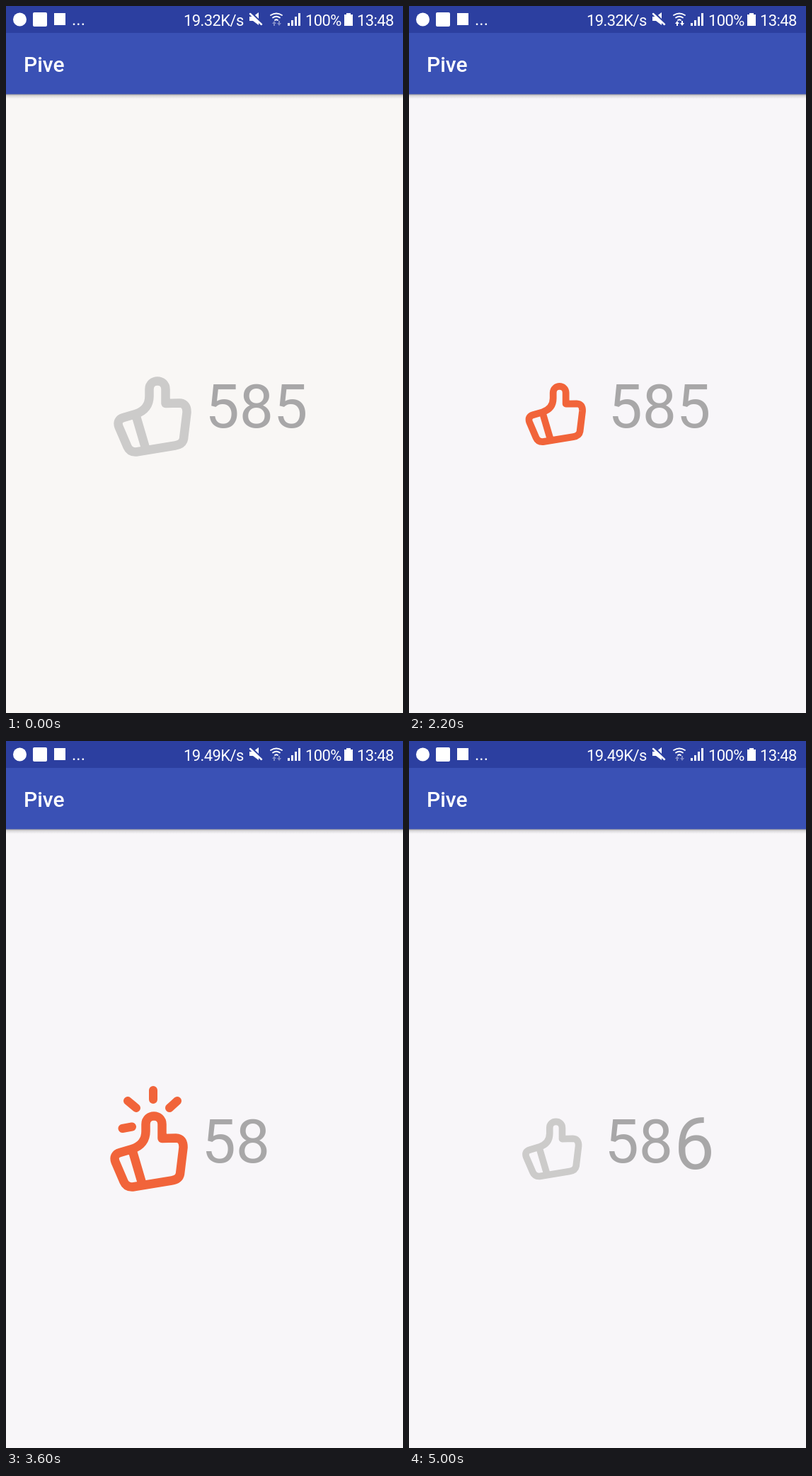
An HTML page for the animation above (5100 ms loop, 561x998 px).

```html
<!DOCTYPE html>
<html lang="en">
<head>
<meta charset="utf-8">
<title>Like button</title>
<style>
  html, body { margin: 0; width: 100%; height: 100%; overflow: hidden; background: #f8f6f9; }
  svg { display: block; width: 100%; height: 100%; font-family: Roboto, sans-serif; }
  .status { fill: #fff; font-size: 22px; letter-spacing: -.6px; }
  .title { fill: #fff; font-size: 30px; font-weight: 500; }
  .count { fill: #a8a7a8; font-size: 86px; }
  .line { fill: none; stroke-linecap: round; stroke-linejoin: round; }
</style>
</head>
<body>
<svg viewBox="0 0 561 998">
  <defs>
    <linearGradient id="shade" x2="0" y2="1">
      <stop offset="0" stop-color="#000" stop-opacity=".4"/>
      <stop offset=".4" stop-color="#000" stop-opacity=".12"/>
      <stop offset="1" stop-color="#000" stop-opacity="0"/>
    </linearGradient>
  </defs>
  <rect id="page" width="561" height="998"/>
  <rect y="124" width="561" height="7" fill="url(#shade)"/>
  <rect width="561" height="124.500" fill="#3a51b5"/>
  <rect width="561" height="38" fill="#2c3fa0"/>
  <text class="title" x="25" y="93">Pive</text>

  <g class="status">
    <circle cx="19.5" cy="19" r="9.5"/>
    <rect x="38" y="9" width="20" height="20" rx="2"/>
    <rect x="68" y="10" width="16" height="17"/>
    <text x="93" y="27" font-size="24" letter-spacing="0">...</text>
    <text id="speed" x="251" y="27.500"></text>
    <text x="423" y="27.500">100%</text>
    <text x="496" y="27.500">13:48</text>
    <path d="M344 15h5l8-6v18l-8-6h-5z"/>
    <path class="line" d="M346 9l16 16" stroke="#2c3fa0" stroke-width="3"/>
    <path class="line" d="M345 11l16 15" stroke="#fff" stroke-width="2.500"/>
    <path class="line" stroke="#fff" stroke-width="1.800" d="M374 13q8-5 16 0M377 16.500q5-3.500 10 0M380 20q2-1.500 4 0"/>
    <path id="arrows" d="M376 25l3-4 3 4h-2v3h-2v-3zM383 24h2v-3h2v3h2l-3 4z"/>
    <path d="M398 24h3v4h-3zM403 20h3v8h-3zM408 15h3v13h-3zM413 10h3v18h-3z"/>
    <path d="M481 10h6v2h3v16h-12v-16h3z"/>
  </g>

  <g id="widget">
    <g id="hand" class="line">
      <path id="thumb" d="M183 576C196 572 202.500 563 202.500 551V541C202.500 525.500 225.500 525.500 225.500 541V561L245 560.500Q256 561 255.500 574L251 611Q249.500 619 239 620.500L184 629.500Q175 630 171.500 622L159.500 594Q156 584 166 581ZL198 627"/>
      <path id="rays" stroke-width="12" d="M169.500 547L183 544.500M177 508L189 518M213 493V506M247 508L236 518"/>
    </g>
    <circle id="ring" cx="208.500" cy="576" fill="none" stroke="#ee4a1e" stroke-width="4"/>
    <text class="count" x="281.500" y="595">58</text>
    <text id="digit" class="count" y="595"></text>
  </g>
</svg>
<script>
const LOOP = 5100, STEP = 100;
const PRESS = 2000, LIKE = 2700, LIKED = 3800, UNLIKE = 4900;
const GREY = '#cccbca', ORANGE = '#f1643a';

const el = {};
document.querySelectorAll('svg [id]').forEach(node => el[node.id] = node);

const set = (node, attrs) => {
  for (const name in attrs) node.setAttribute(name, attrs[name]);
};

// Linear interpolation through [time, value] pairs.
const track = (...keys) => t => {
  const i = keys.findIndex(([time]) => time > t);
  if (i < 0) return keys[keys.length - 1][1];
  if (i === 0) return keys[0][1];
  const [t0, a] = keys[i - 1], [t1, b] = keys[i];
  return a + (b - a) * (t - t0) / (t1 - t0);
};

const handScale = track([1900, 1], [2200, .78], [2400, .75], [2600, .75], [LIKE, .745],
  [2800, .82], [3200, 1], [LIKED, 1], [4100, .753], [4800, .753], [5000, .77]);
const strokeWidth = track([2600, 12.5], [LIKE, 16], [2900, 12.5]);
const rayScale = track([LIKE, .13], [3200, 1]);
const ringRadius = track([LIKE, 32.5], [3200, 57]);
const ringAlpha = track([LIKE, .85], [3200, 0]);
const digitLift = track([LIKE, 3], [3500, -40], [3600, 30], [LIKED, 0],
  [4800, 3], [5000, 9]);
const digitAlpha = track([LIKE, 1], [3500, 0], [3600, 0], [LIKED, 1]);

const scaleAbout = (x, y, s) => `translate(${x} ${y}) scale(${s}) translate(${-x} ${-y})`;

function draw(t) {
  const liking = t >= LIKE && t < LIKED;
  const counting = liking || t >= UNLIKE;
  const orange = t > PRESS && t < UNLIKE;

  set(el.page, { fill: t < PRESS ? '#f9f7f5' : '#f8f6f9' });
  el.speed.textContent = t < 3000 ? '19.32K/s' : '19.49K/s';
  set(el.arrows, { opacity: t >= 1400 && t < LIKE ? 1 : .4 });

  set(el.widget, { transform: `translate(${counting ? -5 : 0} 0)` });
  set(el.hand, { transform: scaleAbout(208, 564, handScale(t)), stroke: orange ? ORANGE : GREY });
  set(el.thumb, { 'stroke-width': strokeWidth(t) });
  set(el.rays, {
    transform: scaleAbout(208.5, 518, rayScale(t)),
    opacity: t >= LIKE && t < UNLIKE ? 1 : 0
  });
  set(el.ring, { r: ringRadius(t), opacity: t >= LIKE ? ringAlpha(t) : 0 });

  el.digit.textContent = t < 3600 ? 5 : 6;
  el.digit.style.fontSize = counting ? '102px' : '86px';
  set(el.digit, {
    x: counting ? 379.5 : 378,
    y: 595 + (counting ? digitLift(t) : 0),
    opacity: digitAlpha(t)
  });
}

function tick() {
  draw(Math.floor(performance.now() % LOOP / STEP) * STEP);
  requestAnimationFrame(tick);
}
tick();
</script>
</body>
</html>
```
